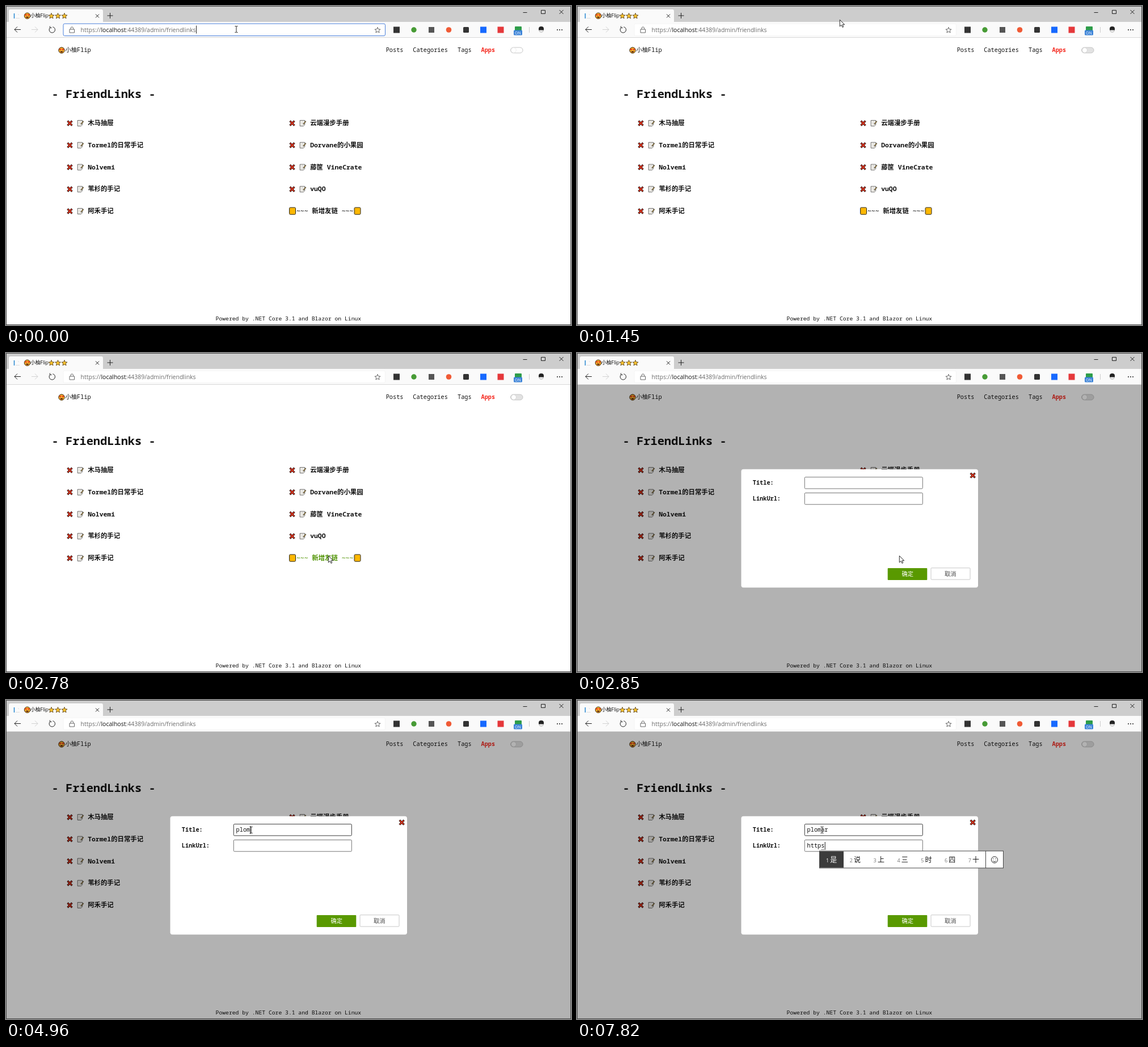
Animation, 996 px wide and 562 px high, one loop 8 s. Source, as an HTML page:

```html
<!DOCTYPE html>
<html lang="zh">
<head>
<meta charset="utf-8">
<title>FriendLinks</title>
<style>
html, body { margin: 0; width: 100%; height: 100%; overflow: hidden; background: #fff; }
svg { display: block; width: 996px; height: 562px; }
text { font: 500 10.25px "Noto Sans Mono", "Noto Sans CJK SC", "Noto Sans CJK", monospace; fill: #111; white-space: pre; }
.ui { font-family: "Open Sans", "Noto Sans CJK SC", "Noto Sans CJK", sans-serif; font-weight: normal; }
.b { font-weight: bold; }
.row { font-size: 11.4px; font-weight: bold; }
.line { fill: none; stroke: #222; stroke-width: 1; }
</style>
</head>
<body>
<svg id="stage" viewBox="0 0 996 562">
  <defs>
    <g id="cross" fill="none" stroke-linecap="square">
      <path d="M-2.8-2.8 2.8 2.8M2.8-2.8-2.8 2.8" stroke="#2a0d08" stroke-width="3.3"/>
      <path d="M-2.8-2.8 2.8 2.8M2.8-2.8-2.8 2.8" stroke="#e8341c" stroke-width="1.7"/>
    </g>
    <g id="memo" stroke="#444" stroke-width=".8">
      <path d="M-5-5H3.5V2.5L1.2 5H-5Z" fill="#f8f6f0"/>
      <path d="M-3-2.5H1.5M-3 0H.5M-3 2.5H-.5" stroke="#bbb" stroke-width=".7"/>
      <path d="M.8 1.8 5.4-3.6" stroke="#333" stroke-width="1.9"/>
      <path d="M1.3 1.2 5.1-3.2" stroke="#e9b949" stroke-width=".9"/>
    </g>
    <g id="book">
      <rect x="-5.5" y="-6" width="11" height="12.2" rx="1.8" fill="#fdb900" stroke="#222"/>
      <path d="M-3.5-5.4V5.6" stroke="#e0a000" stroke-width=".8"/>
    </g>
    <g id="face">
      <circle r="5.2" fill="#f9b52c" stroke="#3a2410"/>
      <path d="M-2.3.2-4.3-1.8-3.4-3-2.3-2.3-1.2-3-.4-1.8ZM2.3.2.4-1.8 1.2-3 2.3-2.3 3.4-3 4.3-1.8Z" fill="#e32a1c"/>
      <path d="M-2.8 1.4H2.8Q2 4 0 4T-2.8 1.4Z" fill="#5a2413"/>
    </g>
    <path id="star" d="M0-5 1.4-1.6 5-1.4 2.2.9 3.1 4.4 0 2.5-3.1 4.4-2.2.9-5-1.4-1.4-1.6Z"/>
  </defs>

  <g id="page">
    <g id="frame">
      <use href="#face" x="98" y="78"/>
      <text x="104.6" y="81.4">小柚Flip</text>
      <text x="669.7" y="81.4">Posts</text>
      <text x="717.3" y="81.4">Categories</text>
      <text x="796" y="81.4">Tags</text>
      <text x="837.5" y="81.4" class="b" style="fill:#f5281e">Apps</text>
      <rect id="track" x="889.5" y="73" width="21.5" height="9.8" rx="4.9" stroke="#c6c6c6"/>
      <circle id="knob" cx="895" cy="77.9" r="4.4" fill="#fff" stroke="#ccc" stroke-width=".7"/>
      <text x="369.6" y="554.3" style="font-size:9.73px">Powered by .NET Core 3.1 and Blazor on Linux</text>
    </g>
    <g id="list">
      <text x="80.6" y="161.5" class="b" style="font-size:20.35px">- FriendLinks -</text>
      <use href="#book" x="505" y="361"/>
      <use href="#book" x="619.5" y="361"/>
      <text id="add" x="512" y="365.2" class="row">~~~ 新增友链 ~~~</text>
    </g>
  </g>

  <g id="modal">
    <rect y="55" width="996" height="507" opacity=".3"/>
    <rect x="289.5" y="204.8" width="417.5" height="208.4" rx="4" fill="#fff"/>
    <use href="#cross" x="697.7" y="215.7"/>
    <text x="309.8" y="232.4" class="b">Title:</text>
    <text x="309.8" y="260.2" class="b">LinkUrl:</text>
    <rect id="box" x="401.3" y="218.7" width="208" height="20.3" rx="1.5" fill="#fff"/>
    <rect x="401.3" y="246.5" width="208" height="20.3" rx="1.5" fill="#fff" stroke="#767676"/>
    <text id="title" x="405.6" y="232.4"></text>
    <text id="link" x="405.6" y="260.2"></text>
    <rect x="547.7" y="379" width="69.6" height="21" rx="1" fill="#599900"/>
    <text x="572.4" y="392.8" style="fill:#fff">确定</text>
    <rect x="624" y="378.7" width="69" height="20.4" rx="1" fill="#fff" stroke="#c8c8c8"/>
    <text x="648" y="392.5" style="fill:#444">取消</text>
    <g id="ime">
      <path d="M430.5 263.5H436.5" stroke="#111" stroke-dasharray="1 1"/>
      <rect x="427.5" y="266" width="324" height="30" fill="#fff" stroke="#444"/>
      <rect x="428" y="266.5" width="42" height="29" fill="#3b3b3b"/>
      <path d="M720.5 266V296" stroke="#444"/>
      <circle class="line" cx="736" cy="281.5" r="5.6"/>
      <path class="line" d="M733 283.3Q736 286.5 739 283.3M734 279v1.4M738 279v1.4"/>
    </g>
  </g>

  <g id="chrome">
    <rect width="996" height="28" fill="#cdcdcd"/>
    <path d="M5 28V9Q5 6 8 6H168Q171 6 171 9V28Z" fill="#fafafa"/>
    <rect y="28" width="996" height="27" fill="#fafafa"/>
    <path d="M0 55.5H996" stroke="#d8d8d8"/>
    <path d="M14.5 13V22" stroke="#2385d0" stroke-width="1.5"/>
    <path d="M17 21.5H24M21 14l2 2" stroke="#ddd"/>
    <use href="#face" x="37.5" y="17.3"/>
    <text x="43" y="20.4" class="ui" style="font-size:8.8px">小柚Flip</text>
    <g fill="#ffc52e" stroke="#4a3410" stroke-width=".8">
      <use href="#star" x="80" y="17.5"/><use href="#star" x="91.5" y="17.5"/><use href="#star" x="103" y="17.5"/>
    </g>
    <path class="line" d="M158 14.5 164 20.5M164 14.5 158 20.5M178.5 17H188.5M183.5 12V22M911.5 11.5H918.5M943.5 7.5H950.5V13.5H943.5ZM975.5 7 982.5 14M982.5 7 975.5 14"/>
    <path class="line" d="M26 41.5H15M20 36.5 15 41.5 20 46.5M77.8 38A5.2 5.2 0 1 0 82.5 36.8M77.5 35.5V38.5H80.5"/>
    <path class="line" d="M45 41.5H56M51 36.5 56 41.5 51 46.5" style="stroke:#d2d2d2"/>
    <rect id="bar" x="101" y="31.2" width="567.5" height="21.3" rx="2.5" fill="#fff"/>
    <path class="line" d="M112 41H120.5V47H112ZM114 41V39.5A2.3 2.6 0 0 1 118.6 39.5V41" style="stroke:#666"/>
    <text x="131.6" y="45.6" class="ui" style="font-size:10.5px;fill:#6b6b6b">https://<tspan fill="#111">localhost</tspan>:44389/admin/friendlinks</text>
    <use href="#star" x="655" y="42.5" class="line" style="stroke:#555;stroke-width:.9"/>
    <rect x="683" y="36.5" width="11" height="11" fill="#333"/>
    <circle cx="719" cy="42" r="4.7" fill="#479b35"/>
    <rect x="745" y="37" width="10" height="10" fill="#555"/>
    <circle cx="780.5" cy="42" r="4.8" fill="#f05a35"/>
    <rect x="806" y="37" width="10" height="10" rx="1.5" fill="#333"/>
    <rect x="836" y="36.5" width="11" height="11" fill="#1769ff"/>
    <rect x="866.5" y="36.5" width="11" height="11" fill="#e5383b"/>
    <rect x="897" y="36" width="12" height="9" rx="1" fill="#2e9d49"/>
    <rect x="895" y="42.5" width="15" height="9" rx="1.5" fill="#3c83d8"/>
    <text x="897" y="49.8" class="ui" style="font-size:7px;fill:#fff">ON</text>
    <path d="M922.5 37V47" stroke="#ccc"/>
    <path d="M940 41H947V44.5Q943.5 48 940 44.5Z" fill="#eee" stroke="#888" stroke-width=".6"/>
    <path d="M939 42.5V40Q939 36 943.5 36T948 40V42.5Z" fill="#222"/>
    <g fill="#222"><circle cx="972" cy="42" r="1"/><circle cx="976" cy="42" r="1"/><circle cx="980" cy="42" r="1"/></g>
  </g>
  <rect x=".5" y=".5" width="995" height="561" fill="none" stroke="#484848"/>

  <rect id="caret" width="1" height="14" fill="#222"/>
  <circle id="click" r="8.3" fill="#ff0" opacity=".47"/>
  <path id="arrow" d="M.3.3V12L3.1 9.5 5 13.5 6.8 12.7 5 8.8H8.7Z" fill="#fff" stroke="#111" stroke-width=".9"/>
  <path id="beam" class="line" d="M-2.5-5.5H-.7L0-4.8.7-5.5H2.5M0-5V5M-2.5 5.5H-.7L0 4.8.7 5.5H2.5"/>
</svg>
<script>
const $ = id => document.getElementById(id);
const between = (t, a, b) => t >= a && t < b;
const show = (id, on) => $(id).setAttribute('visibility', on ? 'visible' : 'hidden');
const move = (id, x, y) => $(id).setAttribute('transform', `translate(${x} ${y})`);
const attr = (id, name, value) => $(id).setAttribute(name, value);

const columns = [
  [107, '木马抽屉', 'Tormel的日常手记', 'Nolvemi', '苇杉的手记', '阿禾手记'],
  [499, '云端漫步手册', 'Dorvane的小果园', '藤筐 VineCrate', 'vuQO']
];
for (const [x, ...names] of columns) {
  $('list').innerHTML += names.map((name, i) => {
    const y = 206.5 + i * 38.75;
    return `<use href="#cross" x="${x + 5.5}" y="${y}"/><use href="#memo" x="${x + 24.2}" y="${y}"/>
      <text class="row" x="${x + 37.2}" y="${y + 3.7}">${name}</text>`;
  }).join('');
}
$('ime').innerHTML += [...'是说上三时四十'].map((word, i) => {
  const x = 439 + i * 41.8, hue = i ? ['#777', '#111'] : ['#fff', '#fff'];
  return `<text class="ui" x="${x}" y="285.5" style="font-size:9px;fill:${hue[0]}">${i + 1}</text>
    <text class="ui" x="${x + 7.3}" y="286" style="font-size:12px;fill:${hue[1]}">${word}</text>`;
}).join('');

// Keystroke times per field
const titleKeys = [4400, 4570, 4640, 4960, 5120, 5270];
const linkKeys = [6520, 6980, 7290, 7360, 7820];
const typed = (keys, t) => keys.filter(k => t >= k).length;

// Pointer: time, x, y
const path = [
  [0, 406, 41], [1449, 406, 41], [1450, 463, 24], [1540, 463, 24], [1690, 560, 150],
  [1840, 680, 330], [1920, 690, 405], [2000, 600, 374], [2150, 600, 374], [2310, 585, 364],
  [2460, 568, 357], [2930, 568, 357], [3080, 530, 290], [3230, 470, 200], [3330, 446, 186],
  [3470, 432, 229], [8000, 432, 229]
];
function pointer(t) {
  const i = path.findIndex(p => p[0] > t), [t0, x0, y0] = path[i - 1], [t1, x1, y1] = path[i];
  const k = (t - t0) / (t1 - t0);
  return [x0 + (x1 - x0) * k, y0 + (y1 - y0) * k];
}

function draw(t) {
  const fresh = t >= 680;
  attr('bar', 'stroke', fresh ? '#f4f4f4' : '#4a80dc');
  show('frame', !between(t, 750, 910));
  show('list', !between(t, 750, 1140));
  attr('track', 'fill', fresh ? '#e2e2e2' : '#fff');
  attr('knob', 'stroke', fresh ? '#ccc' : '#e4e4e4');
  $('add').style.fill = between(t, 2230, 2850) ? '#4f9300' : '#111';

  show('modal', t >= 2850);
  show('ime', t >= 7820);
  attr('box', 'stroke', t >= 3700 ? '#3a3a3a' : '#767676');
  const a = typed(titleKeys, t), b = typed(linkKeys, t);
  $('title').textContent = 'plomar'.slice(0, a);
  $('link').textContent = 'https'.slice(0, b);

  const inLink = t >= 5500;
  show('caret', t < 130 || between(t, 3700, 4170) || between(t, 4400, 6050) ||
    between(t, 6520, 6980) || t >= 7060);
  if (t < 130) move('caret', 335, 34.5);
  else move('caret', 406 + 6.15 * (inLink ? b : a), inLink ? 250 : 222);

  const [x, y] = pointer(t), beam = t < 1450 || t >= 3430;
  show('arrow', !beam);
  show('beam', beam);
  move(beam ? 'beam' : 'arrow', x, y);
  show('click', between(t, 2630, 2780) || between(t, 3700, 3870));
  move('click', x, y);
}

const start = performance.now();
function tick() {
  draw((performance.now() - start) % 8000);
  requestAnimationFrame(tick);
}
tick();
</script>
</body>
</html>
```
